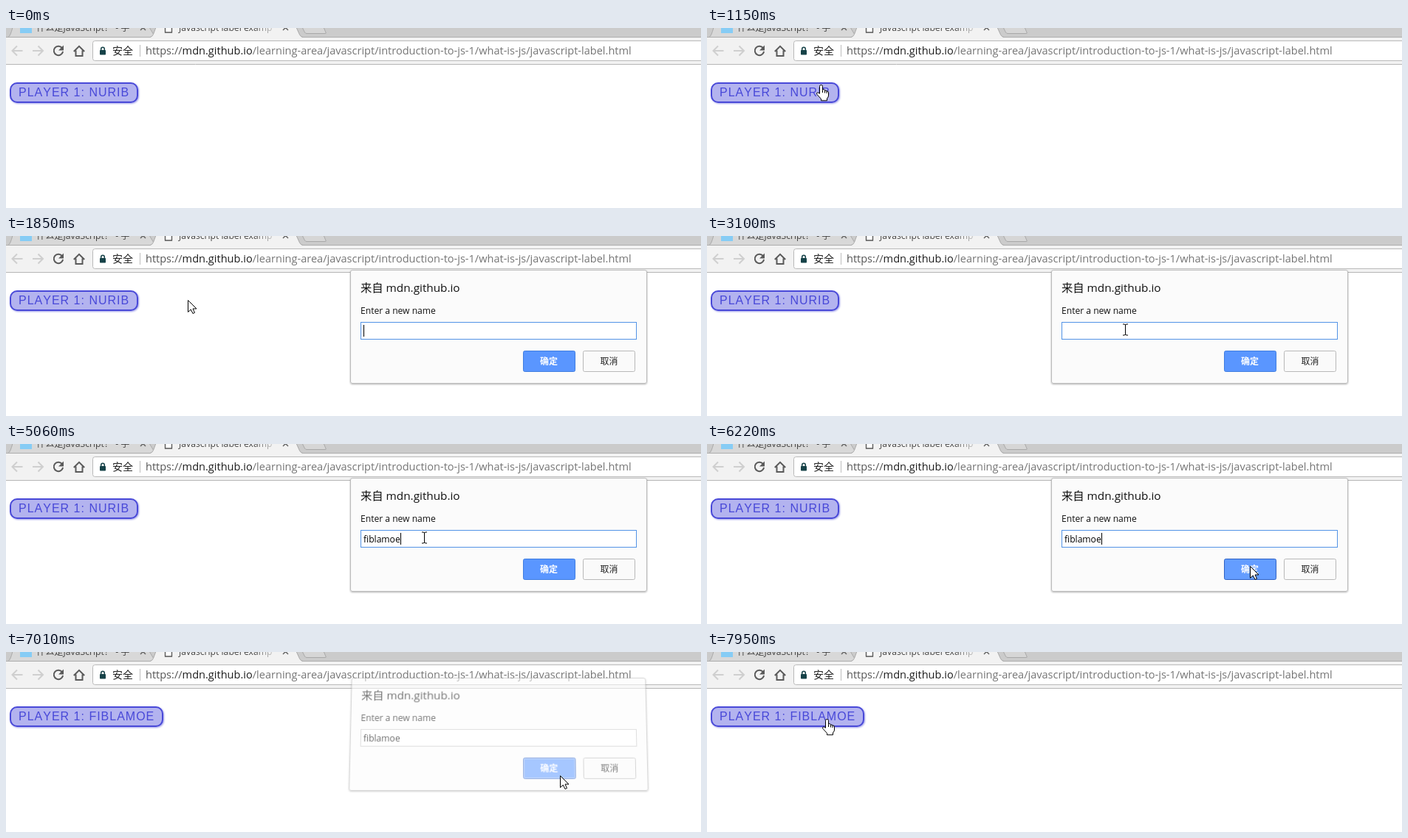
Animation, 941 px wide and 245 px high, one loop 8 s. Source, as an HTML page:

```html
<!DOCTYPE html>
<html lang="zh-CN">
<head>
<meta charset="utf-8">
<title>Prompt dialog</title>
<style>
html, body { margin: 0; width: 100%; height: 100%; overflow: hidden; background: #fff; }
svg { position: absolute; left: 0; top: 0; width: 941px; height: 245px; }
text { font-family: "Open Sans", "Noto Sans CJK SC", "Noto Sans CJK", sans-serif; white-space: pre; }
#dialog { transform-origin: 667px 124px; }
#label { font: 16px "Liberation Sans", Arial, sans-serif; letter-spacing: 1px; font-kerning: none; fill: #4848d8; }
.line { fill: none; stroke-width: 2; }
</style>
</head>
<body>
<svg id="page" viewBox="0 0 941 245">
  <defs>
    <linearGradient id="fade" gradientUnits="userSpaceOnUse" x1="335" x2="366" y1="0" y2="0">
      <stop stop-color="#444"/><stop offset="1" stop-color="#444" stop-opacity=".1"/>
    </linearGradient>
    <filter id="glow" x="-10%" y="-30%" width="120%" height="160%">
      <feDropShadow dx="1" dy="1" stdDeviation="1" flood-color="#0000c8" flood-opacity=".4"/>
    </filter>
  </defs>

  <!-- tab strip -->
  <rect width="941" height="13" fill="#cbcbcb"/>
  <path d="M3 12.5Q6 11 9-1H194L202 12.5Z" fill="#d8d8d8" stroke="#a9a9a9"/>
  <path d="M401-1L404.5 6Q405.500 7.500 407 7.500H432Q434 7.500 433 6L430-1Z" fill="#d6d6d6" stroke="#a9a9a9"/>
  <path d="M0 12.500H941" stroke="#adadad"/>
  <rect y="13" width="941" height="36" fill="#f2f2f2"/>
  <path d="M195 13Q198 12 199.500 8.500L203-1H393L397.500 9Q399 12 402 13Z" fill="#f2f2f2"/>
  <path d="M195 12.500Q198 12 199.500 8.500L203-1M393-1L397.500 9Q399 12 402 12.500" fill="none" stroke="#a9a9a9"/>
  <rect x="19" width="16" height="7" fill="#86ccf5"/>
  <text x="41" y="3.500" font-size="12.200" fill="#444">什么是JavaScript？ - 学</text>
  <path d="M215.500-3V6H224.500V-3" fill="#fff" stroke="#555" stroke-width="1.300"/>
  <text x="234" y="3.500" font-size="12.200" fill="url(#fade)">Javascript label examp</text>
  <path d="M182-4L189 3M189-4L182 3M375-4L382 3M382-4L375 3" stroke="#666" stroke-width="1.500"/>

  <!-- toolbar -->
  <path class="line" d="M22.500 31H8.500M15 24.500L8.500 31L15 37.500M36 31H50M43.500 24.500L50 31L43.500 37.500" stroke="#cfcfcf"/>
  <path class="line" d="M75.800 27A6.200 6.200 0 1 0 77.100 32" stroke="#5a5a5a"/>
  <path d="M78 23.500V30.500H71Z" fill="#5a5a5a"/>
  <path class="line" d="M91.800 32L99 24.800L106.200 32M94.500 30.500V38H103.500V30.500" stroke="#5a5a5a"/>
  <rect x="117.500" y="17.500" width="840" height="27" rx="3" fill="#fff" stroke="#b9b9b9"/>
  <rect x="127" y="30" width="8" height="6.500" rx=".8" fill="#164248"/>
  <path d="M128.700 30.500V28.500A2.300 2.300 0 0 1 133.300 28.500V30.500" fill="none" stroke="#164248" stroke-width="1.500"/>
  <text x="144" y="36" font-size="14" fill="#222">安全</text>
  <path d="M181.500 23V39" stroke="#bdbdbd"/>
  <text x="189" y="36" font-size="14.560" fill="#757575"><tspan fill="#555">https://</tspan><tspan fill="#1c1c1c">mdn.github.io</tspan>/learning-area/javascript/introduction-to-js-1/what-is-js/javascript-label.html</text>
  <path d="M0 49.500H941" stroke="#b6b6b6"/>

  <!-- page button -->
  <rect id="pill" x="6" y="75" width="172" height="26" rx="9" fill="#b3b3ef" stroke="#4848d8" stroke-width="2" filter="url(#glow)"/>
  <text id="label" x="17" y="93"></text>
</svg>

<svg id="dialog" viewBox="0 0 941 245">
  <defs>
    <filter id="drop" x="-5%" y="-5%" width="110%" height="115%">
      <feDropShadow dx="0" dy="1" stdDeviation="1" flood-opacity=".3"/>
    </filter>
  </defs>
  <rect x="466.500" y="46.500" width="401" height="154" rx="2.500" fill="#fbfbfb" stroke="#bcbcbc" filter="url(#drop)"/>
  <text x="480" y="76" font-size="15.300" fill="#111">来自 mdn.github.io</text>
  <text x="480" y="106" font-size="12.100" fill="#111">Enter a new name</text>
  <rect id="field" x="480.500" y="117.500" width="373" height="23" fill="#fff"/>
  <text id="typed" x="484" y="134" font-size="12.100" fill="#000"></text>
  <rect id="caret" y="121" width="1" height="16"/>
  <rect id="ok" x="700.500" y="156.500" width="70" height="28" rx="2"/>
  <rect id="ring" x="701.500" y="157.500" width="68" height="26" rx="1" fill="none" stroke="#fff" stroke-opacity=".4"/>
  <text x="735" y="175.300" font-size="12" font-weight="700" fill="#fff" text-anchor="middle">确定</text>
  <rect x="781.500" y="156.500" width="70" height="28" rx="2" fill="#fafafa" stroke="#b9b9b9"/>
  <text x="816.500" y="175.300" font-size="12" fill="#222" text-anchor="middle">取消</text>
</svg>

<svg id="top" viewBox="0 0 941 245">
  <g id="arrow"><path d="M.5 .5V16.500L4.300 13L7 18.500L9.500 17.400L7 12H12Z" fill="#fff" stroke="#000"/></g>
  <g id="hand" stroke="#000" fill="#fff">
    <path d="M.5 .5Q2.500 .5 2.500 2.500V7.500Q3 6.300 4.300 6.700Q5.500 7 5.500 8.300Q7.500 7.200 8 9Q10.500 8.500 10.500 11V15Q10.500 17 8.500 19V21.800H.5V19.500L-5 13.500Q-6 12 -4.800 11Q-3.500 10.300 -1.500 12.300V2.500Q-1.500 .5 .5 .5Z"/>
    <path d="M2.500 7.500V11M5.500 8.300V11.500M8 9V12" fill="none"/>
  </g>
  <g id="beam"><path d="M-3.500-7.500H-1.500L0-6.500L1.500-7.500H3.500M-3.500 7.500H-1.500L0 6.500L1.500 7.500H3.500M0-7V7" fill="none" stroke="#000"/></g>
</svg>

<script>
const $ = id => document.getElementById(id);
const LOOP = 8000, FIRST = 130, TICK = 77.95;

// Times below count screen refreshes.
const OPEN = 16, SETTLED = 20, CLICK = 84, CLOSE = 87, GONE = 90;
const NAME = "fiblamoe";
const KEYS = [40, 44, 46, 54, 55, 58, 61, 63];

// Pointer stops: tick, x, y
const PATH = [
  [0, 592, 152], [3, 345, 92], [5, 205, 64], [7, 157, 75], [12, 157, 75],
  [13, 154, 77], [21, 154, 77], [24, 430, 108], [26, 566, 127], [72, 566, 127],
  [78, 735, 166], [79, 741, 171], [81, 741, 171], [85, 750, 168], [92, 750, 168],
  [95, 257, 82], [96, 257, 82], [99, 176, 97], [100, 162, 91]
];

function pointer(k) {
  const i = PATH.findIndex(p => p[0] >= k);
  if (i < 0) return PATH[PATH.length - 1].slice(1);
  if (i === 0) return PATH[0].slice(1);
  const [a, ax, ay] = PATH[i - 1], [b, bx, by] = PATH[i];
  const u = (k - a) / (b - a);
  return [Math.round(ax + (bx - ax) * u), Math.round(ay + (by - ay) * u)];
}

const inside = (x, y, l, t, r, b) => x >= l && x < r && y >= t && y < b;
const show = (el, on) => el.style.display = on ? "" : "none";
const paint = (el, fill, stroke) => {
  el.setAttribute("fill", fill);
  el.setAttribute("stroke", stroke);
};

function drawPage(k) {
  const renamed = k >= CLOSE;
  $("label").textContent = "PLAYER 1: " + (renamed ? NAME.toUpperCase() : "NURIB");
  $("pill").setAttribute("width", renamed ? 206 : 172);
}

function drawDialog(k, hover) {
  const open = k >= OPEN && k < GONE;
  show($("dialog"), open);
  if (!open) return;

  let away = 0;
  if (k < SETTLED) away = 0.85 * ((SETTLED - k) / (SETTLED - OPEN)) ** 1.5;
  if (k >= CLOSE) away = 0.12 + (k - CLOSE) * 0.3;
  const s = $("dialog").style;
  s.opacity = 1 - away;
  s.transform = away ? `translateY(${-29 * away}px) perspective(1000px) rotateX(${16 * away}deg)` : "none";

  const count = KEYS.filter(t => t <= k).length;
  const since = k - (count ? KEYS[count - 1] : 17);
  const focused = k < CLICK;
  $("typed").textContent = NAME.slice(0, count);
  const width = count ? $("typed").getComputedTextLength() : 0;
  $("caret").setAttribute("x", 484 + Math.round(width));
  show($("caret"), focused && Math.floor(Math.max(0, since) / 6.8) % 2 === 0);

  paint($("field"), "#fff", focused ? "#5293e6" : "#c6c6c6");
  paint($("ok"), hover ? "#649dff" : "#5a96ff", hover ? "#2f62c4" : "#3f7de0");
  show($("ring"), !focused);
}

function drawPointer(k, x, y) {
  const dialogUp = k >= SETTLED && k < CLOSE;
  let kind = "arrow";
  if (inside(x, y, 5, 74, k >= CLOSE ? 213 : 179, 102)) kind = "hand";
  if (dialogUp && inside(x, y, 480, 117, 854, 141)) kind = "beam";
  for (const id of ["arrow", "hand", "beam"]) show($(id), k >= 0 && id === kind);
  const half = kind === "beam" ? 0.5 : 0;
  $(kind).setAttribute("transform", `translate(${x + half} ${y + half})`);
}

function draw(time) {
  const k = Math.floor((time % LOOP - FIRST) / TICK);
  const [x, y] = pointer(k);
  drawPage(k);
  drawDialog(k, inside(x, y, 700, 156, 771, 185));
  drawPointer(k, x, y);
}

function loop() {
  draw(performance.now());
  requestAnimationFrame(loop);
}
loop();
</script>
</body>
</html>
```
